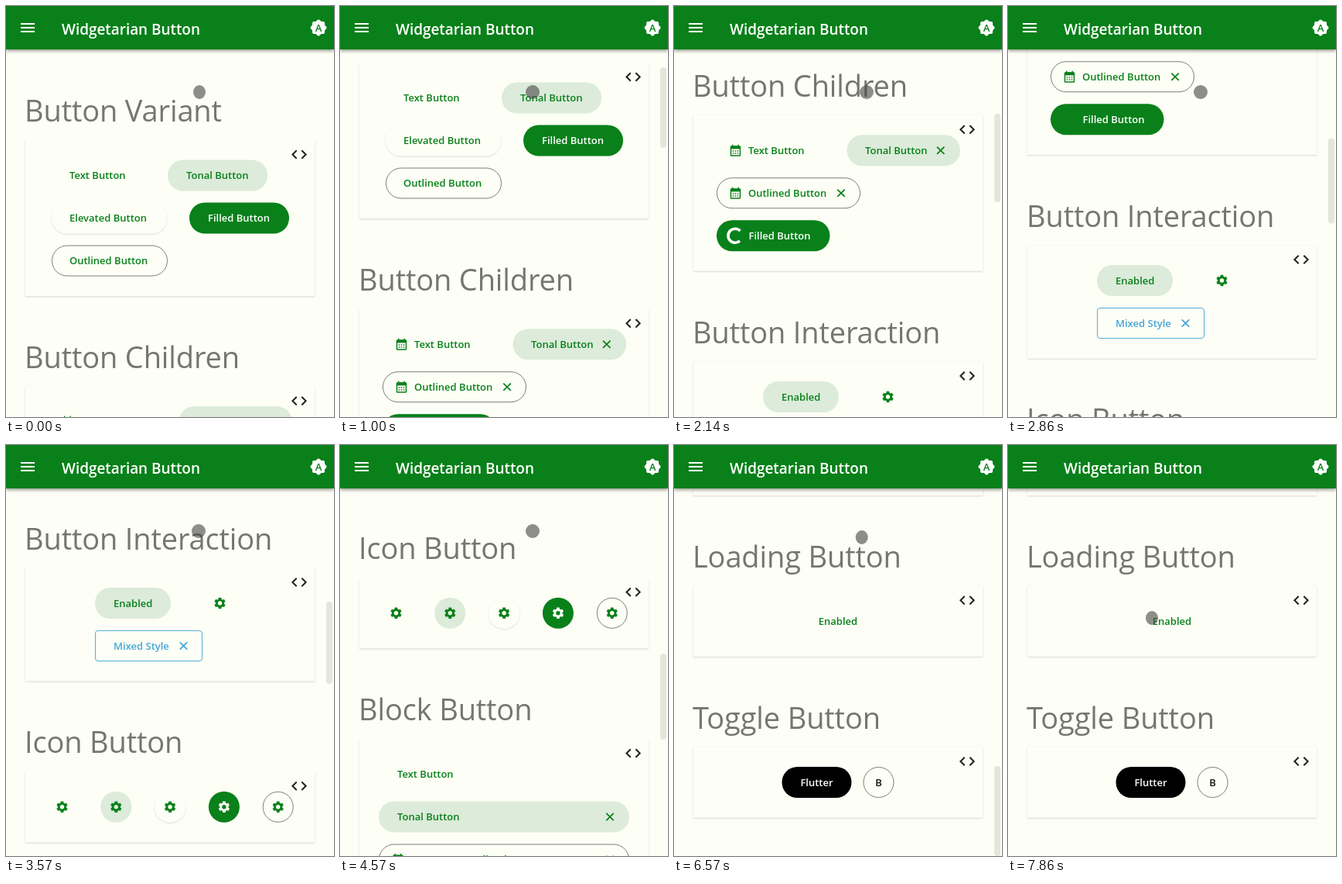
Recreate the animation shown at these times as an HTML page. Size 424x530 px, loop 8 s.

```html
<!DOCTYPE html>
<html lang="en">
<head>
<meta charset="utf-8">
<title>Widgetarian Button</title>
<style>
  html, body { margin: 0; height: 100%; overflow: hidden; background: #fdfef5; }
  svg { display: block; }
  text { font: 600 13px "Open Sans", "Noto Sans", sans-serif; }
  .heading { font-size: 38px; font-weight: 400; letter-spacing: -.15px; fill: #757671; }
  .bar-title { font-size: 19px; letter-spacing: -.05px; fill: #fff; }
  .card { fill: #fdfef5; filter: drop-shadow(0 1px 1px rgba(0, 0, 0, .15)); }
  .elevated { fill: #fdfef5; filter: drop-shadow(0 1px 1px rgba(0, 0, 0, .12)); }
  .tonal { fill: #dcebda; }
  .filled { fill: #09801a; }
  .outlined { fill: none; stroke: #7b807a; }
  .mixed { fill: none; stroke: #4faedd; }
  .text { fill: none; }
  .black { fill: #000; }
  .app-bar { fill: #09801a; filter: drop-shadow(0 2px 2px rgba(0, 0, 0, .4)); }
</style>
</head>
<body>
<svg width="100%" height="100%" viewBox="0 0 424 530">
  <g id="page"></g>
  <rect id="thumb" x="414" width="8" rx="4" fill="#e4e6dc"/>
  <rect class="app-bar" width="424" height="56"/>
  <path d="M19 23h18M19 28h18M19 33h18" stroke="#fff" stroke-width="2"/>
  <text class="bar-title" x="72" y="36.5">Widgetarian Button</text>
  <g transform="translate(404 28)">
    <rect x="-8" y="-8" width="16" height="16" rx="2" fill="#fff"/>
    <rect x="-8" y="-8" width="16" height="16" rx="2" fill="#fff" transform="rotate(45)"/>
    <text y="4.5" text-anchor="middle" fill="#09801a">A</text>
  </g>
  <ellipse id="pointer" ry="9" fill="#484848" fill-opacity=".62"/>
</svg>
<script>
const GREEN = '#09801a', BLUE = '#45a6d8', LOOP = 8000;
const byId = id => document.getElementById(id);

const label = (x, y, str, fill = GREEN, anchor = 'start') =>
  `<text x="${x}" y="${y + 4.8}" fill="${fill}" text-anchor="${anchor}">${str}</text>`;
// Outlines are drawn inside the button's edge.
const box = (kind, left, right, y, radius = 20) => {
  const inset = kind === 'outlined' || kind === 'mixed' ? .5 : 0;
  return `<rect class="${kind}" x="${left + inset}" y="${y - 20 + inset}"
    width="${right - left - 2 * inset}" height="${40 - 2 * inset}" rx="${radius - inset}"/>`;
};
const button = (kind, left, right, y, textX, str) =>
  box(kind, left, right, y) + label(textX, y, str, kind === 'filled' ? '#fff' : GREEN);

// Icons live on a 24-unit grid centred on (x, y).
const icon = (x, y, size, body) => `<g transform="translate(${x} ${y}) scale(${size / 24})">${body}</g>`;
const code = (x, y) => icon(x, y, 24,
  '<path d="M-3.3-5.3L-8.6 0l5.3 5.3M3.3-5.3L8.6 0l-5.3 5.3" fill="none" stroke="#222" stroke-width="2"/>');
const cross = (x, y, color = GREEN) => icon(x, y, 18,
  `<path d="M-6.3-6.3L6.3 6.3M6.3-6.3L-6.3 6.3" stroke="${color}" stroke-width="2.3"/>`);
const calendar = (x, y) => icon(x, y, 18, `<g fill="none" stroke="${GREEN}" stroke-width="2">
  <rect x="-8" y="-7" width="16" height="16" rx="1"/>
  <path d="M-8-5H8" stroke-width="5"/><path d="M-5-10v3M5-10v3"/>
  <path d="M-5 1H5M-5 5H5" stroke-dasharray="2 2"/></g>`);
const gear = (x, y, color = GREEN) => {
  const teeth = [0, 60, 120, 180, 240, 300]
    .map(a => `<path d="M0 6V9.6" stroke-width="5" transform="rotate(${a})"/>`).join('');
  return icon(x, y, 18, `<g fill="none" stroke="${color}">
    <circle r="5.6" stroke-width="4"/>${teeth}</g>`);
};
const spinner = (id, x, y) => `<path id="${id}" transform="translate(${x} ${y})"
  fill="none" stroke="#fff" stroke-width="3.6"/>`;
const iconButton = (kind, x, y) =>
  box(kind, x - 20, x + 20, y) + gear(x, y, kind === 'filled' ? '#fff' : GREEN);

// Each section: title, number of rows, and content drawn from the row centres.
const sections = [
  ['Button Variant', 3, (a, b, c) =>
    button('text', 59, 179, a, 82, 'Text Button') +
    button('tonal', 209, 338, a, 233, 'Tonal Button') +
    button('elevated', 59, 208, b, 82, 'Elevated Button') +
    button('filled', 237, 366, b, 261, 'Filled Button') +
    button('outlined', 59, 209, c, 82, 'Outlined Button')],
  ['Button Children', 3, (a, b, c) =>
    calendar(79.5, a) + label(96, a, 'Text Button') +
    button('tonal', 223.5, 370, a, 247, 'Tonal Button') + cross(344.7, a) +
    button('outlined', 55, 241, b, 96, 'Outlined Button') + calendar(79.5, b) + cross(216, b) +
    button('filled', 55, 201.5, c, 96.5, 'Filled Button') + spinner('spinnerA', 79, c)],
  ['Button Interaction', 2, (a, b) =>
    button('tonal', 115, 213, a, 139, 'Enabled') + gear(276.5, a) +
    box('mixed', 115, 254, b, 4) + label(139, b, 'Mixed Style', BLUE) + cross(229.5, b, BLUE)],
  ['Icon Button', 1, a =>
    ['text', 'tonal', 'elevated', 'filled', 'outlined']
      .map((kind, i) => iconButton(kind, 72.5 + 69.8 * i, a)).join('')],
  ['Block Button', 4, (a, b, c, d) =>
    label(74, a, 'Text Button') +
    button('tonal', 50, 374, b, 74, 'Tonal Button') + cross(349, b) +
    button('outlined', 50, 374, c, 161, 'Outlined Button') + calendar(75, c) + cross(349, c) +
    button('filled', 50, 374, d, 181, 'Filled Button') + spinner('spinnerB', 163.5, d)],
  ['Loading Button', 1, a => label(212, a, 'Enabled', GREEN, 'middle')],
  ['Toggle Button', 1, a =>
    box('black', 139.5, 229.5, a) + label(184.5, a, 'Flutter', '#fff', 'middle') +
    box('outlined', 244.5, 284.5, a) + label(264.5, a, 'B', '#111', 'middle')],
];

let baseline = 149;
byId('page').innerHTML = sections.map(([title, rows, content]) => {
  const centres = Array.from({ length: rows }, (_, i) => 69.5 + 55 * i);
  const group = `<g transform="translate(0 ${baseline})">
    <text class="heading" x="24">${title}</text>
    <rect class="card" x="25" y="24" width="374" height="${36 + 55 * rows}" rx="1"/>
    ${content(...centres)}${code(379, 42.5)}</g>`;
  baseline += 152.75 + 55 * rows;
  return group;
}).join('');

const clamp = v => Math.min(1, Math.max(0, v));

// Linear interpolation through [position, value] points.
function track(points, at) {
  const next = points.findIndex(p => p[0] > at);
  if (next < 0) return points[points.length - 1][1];
  if (next === 0) return points[0][1];
  const [x0, v0] = points[next - 1], [x1, v1] = points[next];
  return v0 + (v1 - v0) * (at - x0) / (x1 - x0);
}

const PAGE_END = 1470;
const scrollTrack = [[0, 0], [430, 0], [1000, 100], [2140, 350], [3570, 650],
  [4570, 900], [5570, 1250], [6280, 1500]];
const thumbTop = [[0, 56], [100, 79], [350, 139], [650, 202], [900, 269], [1250, 360], [1470, 414]];
const thumbHeight = [[100, 104], [350, 114], [650, 106], [900, 111], [1250, 116]];
const pointerX = [[0, 250], [300, 249], [5300, 249], [5570, 246], [6500, 246], [7800, 186]];
const pointerY = [[0, 111], [5300, 111], [5570, 113], [6500, 113], [7800, 223]];

// cubic-bezier(.4, 0, .2, 1), solved by bisection
function ease(x) {
  let lo = 0, hi = 1;
  for (let i = 0; i < 20; i++) {
    const s = (lo + hi) / 2, r = 1 - s;
    if (1.2 * r * r * s + .6 * r * s * s + s ** 3 < x) lo = s; else hi = s;
  }
  return 3 * (1 - lo) * lo * lo + lo ** 3;
}

// Material indeterminate ring: head and tail chase each other while the ring turns.
function drawSpinner(id, elapsed) {
  const phase = elapsed / 1333 % 1, turn = elapsed / 2222 % 1;
  const head = ease(clamp(phase * 2)), tail = ease(clamp(phase * 2 - 1));
  const start = Math.PI * (-.5 + 1.5 * tail + 2 * turn + .5 * phase);
  const sweep = Math.max(.01, 1.5 * Math.PI * (head - tail));
  const point = a => `${9 * Math.cos(a)} ${9 * Math.sin(a)}`;
  byId(id).setAttribute('d',
    `M${point(start)}A9 9 0 ${sweep > Math.PI ? 1 : 0} 1 ${point(start + sweep)}`);
}

function set(id, attributes) {
  for (const name in attributes) byId(id).setAttribute(name, attributes[name]);
}

function draw(t) {
  // The wheel moves the page in hard notches of 50 until it reaches the end.
  const scroll = Math.min(PAGE_END, Math.round(track(scrollTrack, t) / 50) * 50);
  set('page', { transform: `translate(0 ${-scroll})` });
  set('thumb', {
    y: track(thumbTop, scroll),
    height: track(thumbHeight, scroll),
    opacity: Math.min(clamp((t - 560) / 300), clamp((7100 - t) / 300)),
  });
  set('pointer', {
    cx: track(pointerX, t),
    cy: track(pointerY, t),
    rx: t > 140 && t < 5400 ? 9 : 8,
  });
  drawSpinner('spinnerA', t - 1540 + 6666);
  drawSpinner('spinnerB', t - 2264 + 6666);
}

const begin = performance.now();
function tick() {
  draw((performance.now() - begin) % LOOP);
  requestAnimationFrame(tick);
}
tick();
</script>
</body>
</html>
```
